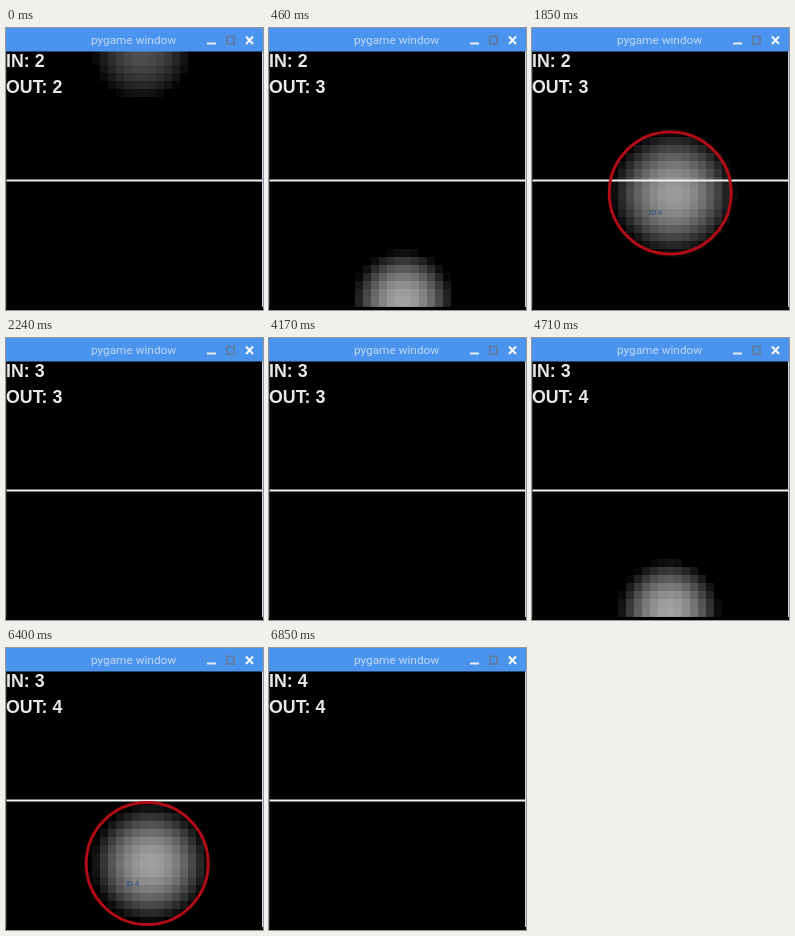
Recreate the animation shown at these times as an HTML page with a canvas. Size 257 px wide and 282 px high, loop 8 s.

```html
<!DOCTYPE html>
<html lang="en">
<head>
<meta charset="utf-8">
<title>pygame window</title>
<style>
  html, body { margin: 0; width: 100%; height: 100%; overflow: hidden; background: #000; }
  canvas { display: block; }
</style>
</head>
<body>
<canvas id="stage" width="257" height="282"></canvas>
<script>
const ctx = document.getElementById('stage').getContext('2d');
const LOOP = 8000;
const SAMPLE = 77;
const CELL = 8, GRID_X = -2, GRID_Y = 21;
const VIEW = { top: 23, bottom: 279, width: 256 };
const LINE_Y = 152.5;
const FLOOR_Y = 273, SPAN = 250;

// A walker may be glimpsed at the bottom edge before it starts to move.
const walks = [
  { start: 0, stop: 460, end: 540, enterX: 136, exitX: 134 },
  { glimpse: 1390, start: 1540, stop: 2080, end: 2240, enterX: 119, exitX: 142, up: true },
  { start: 4320, stop: 4710, end: 4860, enterX: 132, exitX: 137 },
  { glimpse: 5930, start: 6170, stop: 6770, end: 6850, enterX: 184, exitX: 137, up: true }
];

const clamp01 = v => Math.min(1, Math.max(0, v));

// Progress along a walk, held between camera samples.
function progress(walk, t) {
  const duration = walk.stop - walk.start;
  const steps = Math.round(duration / SAMPLE);
  return Math.floor(clamp01((t - walk.start) / duration) * steps) / steps;
}

function heightAt(walk, t) {
  const p = progress(walk, t);
  return FLOOR_Y - SPAN * (walk.up ? p : 1 - p) ** 1.5;
}

function poseAt(t) {
  const walk = walks.find(w => t >= (w.glimpse ?? w.start) && t < w.end);
  if (!walk) return null;
  const glimpsed = t < walk.start;
  const y = heightAt(walk, t);
  const drift = (1 - progress(walk, t)) ** 4;
  return {
    x: walk.exitX + (walk.enterX - walk.exitX) * drift,
    y,
    radius: (64 - 12 * ((y - 150) / 125) ** 2) * (glimpsed ? 0.42 : 1),
    peak: 165 * (1 - Math.exp(-(y + 20) / 65)) * (glimpsed ? 0.32 : 1)
  };
}

function countAt(t, up) {
  const crossed = w => t >= w.start && (heightAt(w, t) < LINE_Y) === up;
  return 2 + walks.filter(w => Boolean(w.up) === up && crossed(w)).length;
}

function drawHeat({ x, y, radius, peak }) {
  for (let top = GRID_Y; top < VIEW.bottom; top += CELL) {
    for (let left = GRID_X; left < VIEW.width; left += CELL) {
      const distance = Math.hypot(left + CELL / 2 - x, top + CELL / 2 - y) / radius;
      const level = Math.round(peak * Math.max(0, 1 - distance ** 2) ** 1.25);
      if (level < 5) continue;
      ctx.fillStyle = `rgb(${level},${level},${level})`;
      ctx.fillRect(left, top, CELL, CELL);
    }
  }
}

function drawTracker({ x, y }) {
  if (y < 58 || y > 245) return;
  ctx.strokeStyle = '#b00c16';
  ctx.lineWidth = 3;
  ctx.beginPath();
  ctx.arc(x - 3, y, 61, 0, Math.PI * 2);
  ctx.stroke();
  ctx.fillStyle = '#2b4c80';
  ctx.font = '7px "Liberation Sans", sans-serif';
  ctx.fillText('ID 4', x - 24, y + 22);
}

function drawText(text, x, y, font, color) {
  ctx.font = font;
  ctx.fillStyle = color;
  ctx.fillText(text, x, y);
}

function drawCounter(text, y) {
  drawText(text, 0, y, 'bold 17.8px "Liberation Sans", Arial, sans-serif', '#e8e8e8');
}

function drawTitleBar() {
  ctx.fillStyle = '#4a94ee';
  ctx.fillRect(0, 0, 257, 23.5);
  drawText('pygame window', 85, 16, '11.8px Roboto, sans-serif', '#c0d9f7');
  ctx.fillStyle = '#e4effc';
  ctx.fillRect(201, 14.5, 9, 2);
  ctx.strokeStyle = '#5c7ea8';
  ctx.lineWidth = 2;
  ctx.strokeRect(221, 8.5, 7, 7.5);
  ctx.strokeStyle = '#f4f9ff';
  ctx.beginPath();
  ctx.moveTo(240, 8.5); ctx.lineTo(247, 16);
  ctx.moveTo(247, 8.5); ctx.lineTo(240, 16);
  ctx.stroke();
}

function drawFrame() {
  const height = VIEW.bottom - VIEW.top;
  ctx.fillStyle = '#444';
  ctx.fillRect(0, VIEW.top, 0.6, height);
  ctx.fillStyle = '#ccd4ea';
  ctx.fillRect(VIEW.width, VIEW.top, 1, height);
}

function draw(t) {
  ctx.fillStyle = '#000';
  ctx.fillRect(0, 0, 257, 282);
  ctx.save();
  ctx.beginPath();
  ctx.rect(0, VIEW.top, VIEW.width, VIEW.bottom - VIEW.top);
  ctx.clip();
  const pose = poseAt(t);
  if (pose) drawHeat(pose);
  ctx.fillStyle = '#f0f0f0';
  ctx.fillRect(0, LINE_Y - 1, VIEW.width, 2);
  if (pose) drawTracker(pose);
  ctx.restore();
  drawFrame();
  drawCounter('IN: ' + countAt(t, true), 39);
  drawCounter('OUT: ' + countAt(t, false), 65);
  drawTitleBar();
}

const origin = performance.now();
function tick() {
  draw((performance.now() - origin) % LOOP);
  requestAnimationFrame(tick);
}
tick();
</script>
</body>
</html>
```
